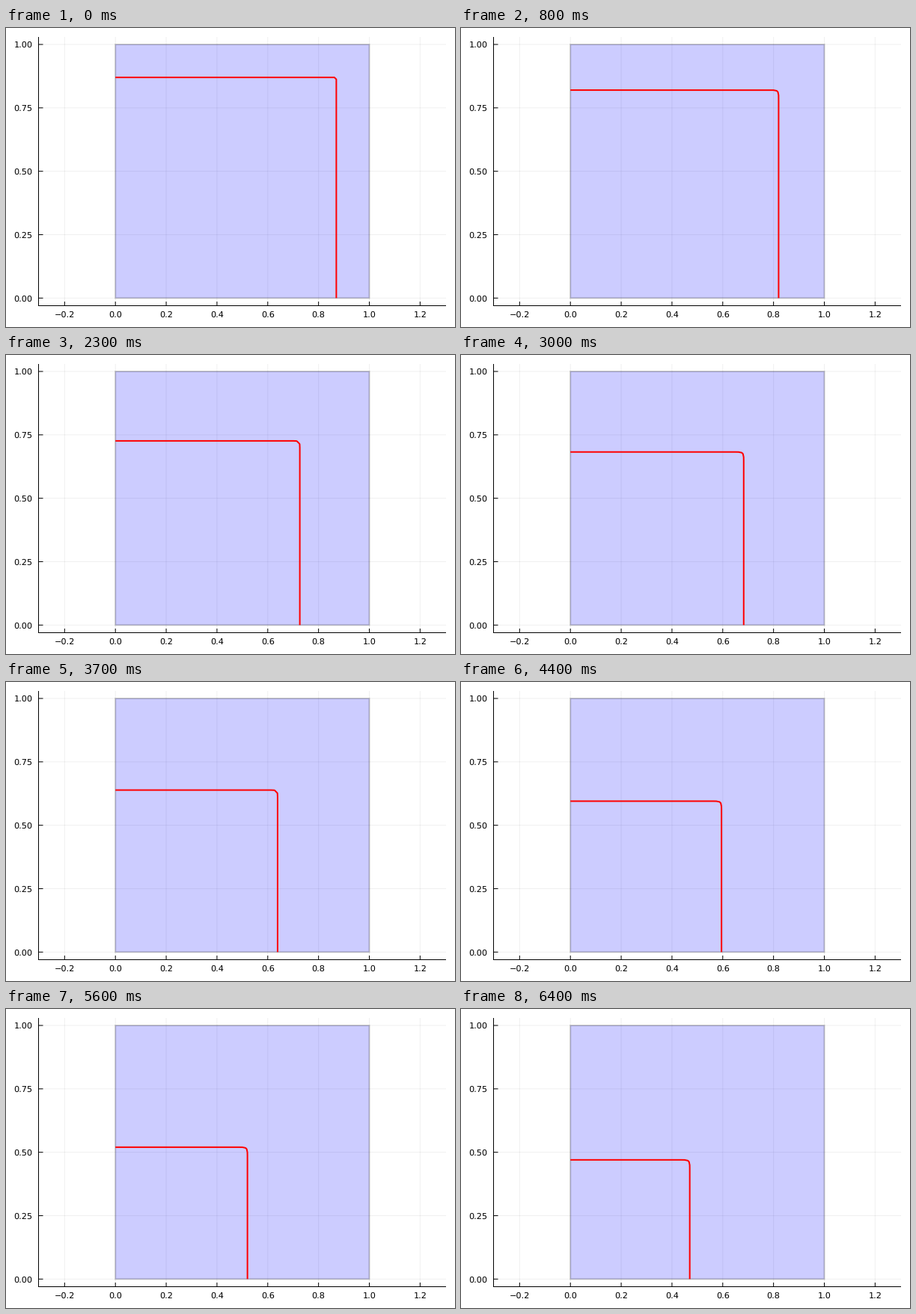
These frames come from a looping animation (600x400 px, 6500 ms). A matplotlib script:

```python
import numpy as np
import matplotlib.pyplot as plt
from matplotlib.animation import FuncAnimation
from matplotlib.patches import Rectangle

W, H, DPI = 600, 400, 100
PX = 72 / DPI                      # points per pixel
FRAMES, INTERVAL = 65, 100
LEFT, RIGHT, TOP, BOTTOM = 43.5, 588, 12, 371.5
X0, Y0, UNIT = 146.2, 361.3, 339.3
FONT = 11.2 * PX

plt.rcParams["font.family"] = "DejaVu Sans"
plt.rcParams["text.hinting"] = "none"


def px(x):
    return X0 + UNIT * x


def py(y):
    return Y0 - UNIT * y


def slope(phi, axis):
    """Forward difference, extended linearly at the far edge."""
    d = np.diff(phi, axis=axis)
    last = np.take(d, [-1], axis=axis)
    return np.maximum(np.concatenate([d, last], axis=axis), 0)


def zero_line(phi, grid):
    """Zero level of a field symmetric in x and y and rising in both."""
    cols = np.flatnonzero(phi[:, 0] < 0)
    a = grid[cols]
    b = np.array([np.interp(0, phi[i], grid) for i in cols])
    x, y = np.concatenate([a, b]), np.concatenate([b, a])
    order = np.argsort(x - y)
    return x[order], y[order]


def evolve(cells=80, start=0.87):
    """Level set front moving inward at unit speed, upwind scheme."""
    grid = np.linspace(0, 1, cells + 1)
    h = 1 / cells
    dt = h / 2
    phi = np.maximum.outer(grid, grid) - start
    lines = []
    for _ in range(FRAMES):
        lines.append(zero_line(phi, grid))
        phi = phi + dt * np.hypot(slope(phi, 0), slope(phi, 1)) / h
    return lines


fig = plt.figure(figsize=(W / DPI, H / DPI), dpi=DPI, facecolor="white")
ax = fig.add_axes([0, 0, 1, 1])
ax.set_xlim(0, W)
ax.set_ylim(H, 0)
ax.axis("off")


def stroke(xs, ys, width=1, **kw):
    return ax.plot(xs, ys, lw=width * PX, solid_capstyle="butt",
                   snap=False, **kw)[0]


xticks = np.arange(-1, 7) / 5
yticks = np.arange(5) / 4

for t in xticks:
    x = px(t)
    stroke([x, x], [TOP, BOTTOM], color="black", alpha=0.06, zorder=1)
    stroke([x, x], [BOTTOM, BOTTOM - 5.5], color="black", zorder=4)
    label = f"{t:.1f}".replace("-", "\u2212")
    ax.text(x, 387, label, size=FONT, ha="center", va="baseline")

for t in yticks:
    y = py(t)
    stroke([LEFT, RIGHT], [y, y], color="black", alpha=0.06, zorder=1)
    stroke([LEFT, LEFT + 6], [y, y], color="black", zorder=4)
    ax.text(35.7, y + 4.2, f"{t:.2f}", size=FONT, ha="right", va="baseline")

stroke([LEFT, LEFT], [TOP, BOTTOM + 0.5], color="black", zorder=4)
stroke([LEFT, RIGHT], [BOTTOM, BOTTOM], color="black", zorder=4)

box = dict(xy=(px(0), py(1)), width=UNIT, height=UNIT, alpha=0.2, snap=False)
ax.add_patch(Rectangle(**box, fc="blue", ec="none", zorder=2))
ax.add_patch(Rectangle(**box, fc="none", ec="black", lw=2 * PX, zorder=2.5))

front = stroke([], [], width=2, color="red", zorder=3,
               solid_joinstyle="round")
lines = evolve()


def draw(k):
    x, y = lines[k]
    front.set_data(px(x), py(y))
    return front,


anim = FuncAnimation(fig, draw, frames=FRAMES, interval=INTERVAL,
                     init_func=lambda: draw(0), repeat=True, repeat_delay=0)
plt.show()
```
